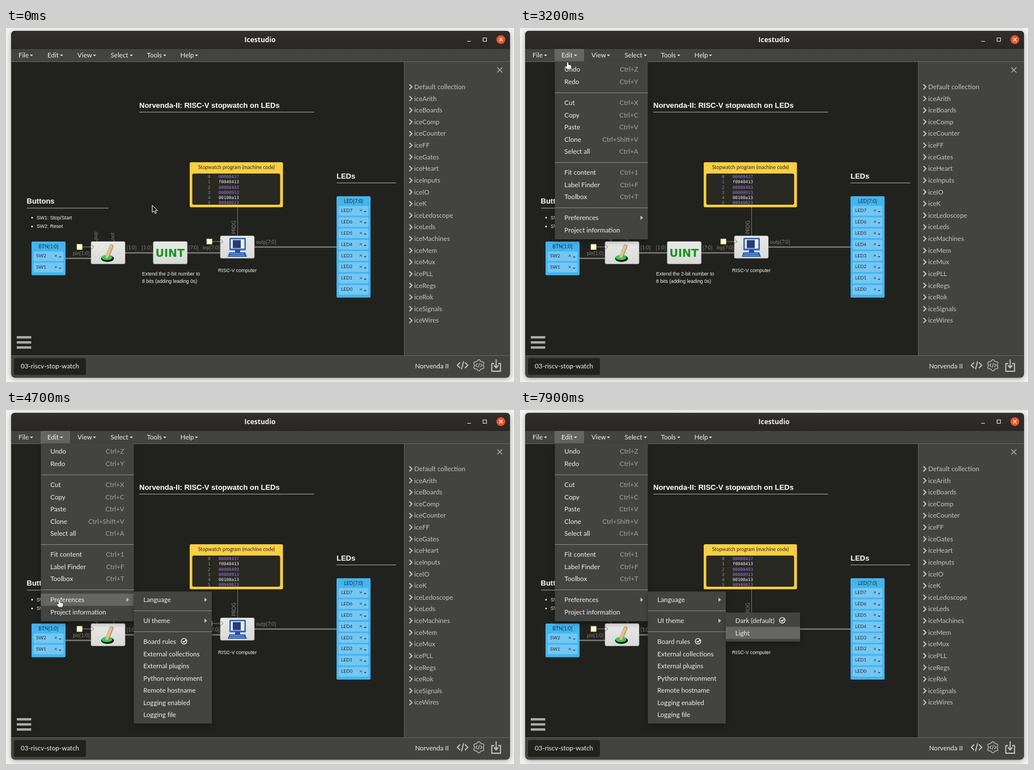
Recreate the animation shown at these times as an HTML page. Size 896 by 625 pixels, loop 8000 ms.

```html
<!DOCTYPE html>
<html lang="en">
<head>
<meta charset="utf-8">
<title>Icestudio</title>
<style>
  html, body { margin: 0; width: 100%; height: 100%; overflow: hidden; background: #f1f2f0; }
  svg { display: block; width: 896px; height: 625px; }
  text { white-space: pre; font-family: Lato, sans-serif; font-size: 11.6px; fill: #f0f0ee; }
  .head { font: bold 13px "Liberation Sans", Arial, sans-serif; fill: #fff; }
  .note { font: 8.7px "Liberation Sans", Arial, sans-serif; fill: #f4f4f4; }
  .port { font-size: 8.7px; fill: #82827f; }
  .label { font-size: 8.8px; fill: #202a30; }
  .pin { font-size: 8.3px; fill: #1c2d38; }
  .code { font: 7.5px "DejaVu Sans Mono", monospace; }
  .dim { fill: #a2a2a0; }
  .item { fill: #c4c4c2; }
  .menu { filter: drop-shadow(0 4px 5px rgba(0, 0, 0, .3)); }
</style>
</head>
<body>
<svg id="stage" viewBox="0 0 896 625">
  <defs>
    <linearGradient id="bar" x2="0" y2="1"><stop stop-color="#302f2d"/><stop offset="1" stop-color="#282725"/></linearGradient>
    <linearGradient id="chip" x2="0" y2="1"><stop stop-color="#e9e9e7"/><stop offset="1" stop-color="#d9d9d7"/></linearGradient>
    <filter id="soft" x="-5%" y="-5%" width="110%" height="110%"><feGaussianBlur stdDeviation="4"/></filter>
  </defs>
  <g id="scene"></g>
  <g id="menus"></g>
  <g id="arrow"><path d="M0 0V12.7L3 10L5.2 14.7L7.3 13.7L5.2 9.2H9.4Z" fill="#1c1c1c" stroke="#fff" stroke-linejoin="round"/></g>
  <g id="hand">
    <path d="M-1.6 1Q0-1 1.6 1V4.6L5.7 5.7Q7.3 6.2 7 8.5L6 13.3H-1L-4.8 8.4Q-4.8 6.4-1.6 7.8Z" fill="#fff" stroke="#222" stroke-width=".8"/>
    <path d="M-.6 11.8H5M2 7.5V9.5M4 7.8V9.5" stroke="#777" stroke-width=".6"/>
  </g>
</svg>
<script>
const $ = id => document.getElementById(id);
const rect = (x, y, w, h, fill, extra = '') =>
  `<rect x="${x}" y="${y}" width="${w}" height="${h}" fill="${fill}" ${extra}/>`;
const text = (x, y, s, cls = '', extra = '') => `<text x="${x}" y="${y}" class="${cls}" ${extra}>${s}</text>`;
const line = (d, color, w = 1, extra = '') => `<path d="${d}" fill="none" stroke="${color}" stroke-width="${w}" ${extra}/>`;
const shape = (d, fill) => `<path d="${d}" fill="${fill}"/>`;
const caret = (x, y, color, r = 3) => shape(`M${x - r} ${y}h${2 * r}l${-r} ${r}Z`, color);
const mid = 'text-anchor="middle"', end = 'text-anchor="end"';

function windowFrame() {
  let s = rect(9, 7, 880, 612, '#777', 'rx="7" filter="url(#soft)" opacity=".65"')
    + rect(9, 5, 880, 612.5, '#434441', 'rx="7"')
    + shape('M9 37V12Q9 5 16 5H882Q889 5 889 12V37Z', 'url(#bar)')
    + text(448, 25, 'Icestudio', '', `${mid} style="font:bold 12px 'Open Sans',sans-serif"`)
    + line('M813.5 23.5h6.5M841.5 17.5h6v6h-6Z', '#e8e8e6', 1.1)
    + '<circle cx="872.8" cy="20.5" r="7.8" fill="#e9552b"/>'
    + line('M869.8 17.5l6 6m0-6l-6 6', '#fff', 1.2)
    + rect(9.5, 59, 693, 519, '#21221e')
    + line('M9 59.5H889M702.5 59V578M9 578.5H889', '#646562');
  s += rect(14, 583, 127, 29.5, '#21221e', 'rx="3"') + text(26, 601, '03-riscv-stop-watch')
    + text(781, 601, 'Norvenda II', '', end);
  for (let i = 0; i < 3; i++) s += rect(19, 544 + 9 * i, 25.5, 4.2, '#aaaaa8');
  s += line('M801 590.5l-5 5 5 5M809.5 590.5l5 5-5 5M807 588.5l-3.5 14', '#c4c4c2', 1.8);
  let gear = '';
  for (let i = 0; i < 64; i++) {
    const a = i * Math.PI / 32, r = 8.8 + 1.1 * Math.cos(6 * a);
    gear += `${i ? 'L' : 'M'}${(834 + r * Math.sin(a)).toFixed(1)} ${(595.5 - r * Math.cos(a)).toFixed(1)}`;
  }
  s += line(gear + 'Z', '#c4c4c2', 1.3)
    + line('M831.5 592.5l-3 3 3 3M836.5 592.5l3 3-3 3M835 591.5l-2 8', '#c4c4c2', 1.1)
    + line('M861 592.5h-4.2v13.5h15.4V592.5H868M864.5 585v14M860.5 595.5l4 4.5 4-4.5', '#c4c4c2', 1.9);
  return s;
}

function menuBar() {
  return [['File', 22, 42], ['Edit', 73, 95], ['View', 126, 153], ['Select', 184.5, 218], ['Tools', 248.5, 277], ['Help', 307.5, 333]]
    .map(([s, x, c]) => text(x, 52, s) + caret(c + 3, 47, '#eeeeec', 2.8)).join('');
}

function sidePanel() {
  const names = ('Default collection,iceArith,iceBoards,iceComp,iceCounter,iceFF,iceGates,iceHeart,iceInputs,iceIO,iceK,'
    + 'iceLedoscope,iceLeds,iceMachines,iceMem,iceMux,icePLL,iceRegs,iceRok,iceSignals,iceWires').split(',');
  return line('M866.5 69.5l9 9m0-9l-9 9', '#b4b4b2', 1.3) + names.map((n, i) => {
    const y = 104 + 20.62 * i;
    return line(`M711.5 ${y - 4.5}l4.5 4.5-4.5 4.5`, '#c4c4c2', 2) + text(720, y + 4, n, 'item');
  }).join('');
}

function pinBlock(x, y, h, title, pins, first, pitch) {
  let s = rect(x, y, 60, h, '#41b5f0', 'rx="2"') + text(x + 30, y + 11.5, title, 'label', mid);
  pins.forEach((p, i) => {
    const c = first + pitch * i;
    s += rect(x + 3.5, c - 7.8, 53, 17, '#75c6f3', 'rx="2"') + text(x + 8, c + 2.8, p, 'pin')
      + line(`M${x + 41} ${c - 1.8}l3.6 3.6m0-3.6l-3.6 3.6`, '#24485c') + caret(x + 50.5, c + 1.2, '#1d3a4b', 2.4);
  });
  return s;
}

function clockPort(x, y) {
  return line(`M${x + 9} ${y}h18`, '#8a8a87') + rect(x, y - 4.7, 9.4, 9.4, '#ffffc4', 'stroke="#d8d8a0" stroke-width=".5"');
}

const chip = (x, y) => rect(x, y, 60, 39.5, 'url(#chip)', 'rx="2.5" stroke="#c2c2c0" stroke-width=".5"');
const notch = (x, y) => line(`M${x} ${y - 4}l4.5 4-4.5 4`, '#767673');

function program() {
  const code = ['00008437', 'f0040413', '00000493', '00000913', '00100a13', '00940023'];
  let s = rect(324, 237, 164.5, 79.5, '#f9cf43', 'rx="2.5"')
    + text(406.5, 249, 'Stopwatch program (machine code)', 'label', mid)
    + rect(328.5, 257, 155, 55, '#282923', 'rx="3"');
  code.forEach((c, i) => {
    const y = 265.3 + 9.1 * i;
    s += text(360.5, y, i, 'code', `${end} style="fill:#8f908a"`)
      + text(375, y, c, 'code', `style="fill:${i === 1 || i === 4 ? '#f8f8f2' : '#a47be8'}"`);
  });
  return s;
}

function diagram() {
  const leds = Array.from({ length: 8 }, (_, i) => 'LED' + (7 - i));
  return text(235, 141, 'Norvenda-II: RISC-V stopwatch on LEDs', 'head')
    + text(583, 265.5, 'LEDs', 'head') + text(36.5, 310, 'Buttons', 'head')
    + line('M235 148.5H543.5M583 273.5H688M37 318H181', '#a9a9a7')
    + '<circle cx="46" cy="335" r="1.4" fill="#fff"/><circle cx="46" cy="350.5" r="1.4" fill="#fff"/>'
    + text(54, 337.5, 'SW1: Stop/Start', 'note') + text(54, 353, 'SW2: Reset', 'note')
    + text(240, 436.5, 'Extend the 2-bit number to', 'note') + text(240, 449.5, '8 bits (adding leading 0s)', 'note')
    + text(374, 431, 'RISC-V computer', 'note')
    + line('M105 406.7H150M210 397H260M319 397H378M438 386.7H583', '#777774', 2.6)
    + line('M408.5 316V367', '#777774')
    + line('M160.5 374V377M190 374V377', '#777774')
    + clockPort(125, 386.5) + clockPort(354, 377)
    + text(118, 400.5, 'pin[1:0]', 'port') + text(212.5, 390.5, '[1:0]', 'port') + text(239.5, 390.5, '[1:0]', 'port')
    + text(322, 390.5, '[7:0]', 'port') + text(347, 390.5, 'inp[7:0]', 'port') + text(441, 381, 'outp[7:0]', 'port')
    + [[161, 374, 'pup'], [190.5, 374, 'not'], [405, 364, 'PROG']]
      .map(([x, y, s]) => text(0, 0, s, 'port', `transform="translate(${x} ${y}) rotate(-90)"`)).join('')
    + pinBlock(45, 377, 59.5, 'BTN[1:0]', ['SW2', 'SW1'], 402.2, 19.8)
    + pinBlock(583, 297, 179, 'LED[7:0]', leds, 322, 19.93)
    + program()
    + chip(150, 377) + notch(150.5, 386.5)
    + '<ellipse cx="179" cy="407" rx="11.5" ry="6" fill="#171717"/><ellipse cx="178" cy="405.3" rx="9.5" ry="4.5" fill="#20d64c"/>'
    + line('M178.5 404L186 385.5', '#b08c5c', 7, 'stroke-linecap="round"')
    + line('M178 403.5L185.5 385.5', '#dfc494', 5, 'stroke-linecap="round"')
    + chip(259.7, 377)
    + text(289.3, 403.5, 'UINT', '', `${mid} style="font:bold 19px 'DejaVu Sans',sans-serif;fill:#15951f"`)
    + chip(378, 367) + notch(378.5, 377)
    + rect(394, 370.5, 29, 22, '#2b62b5', 'rx="1.5"') + rect(396.5, 373, 24, 16.5, '#e8eef6')
    + rect(400, 374.5, 14, 14, '#283b76')
    + rect(404, 392, 9, 4, '#264f94')
    + shape('M394 396H422L425 404H391Z', '#2b62b5') + line('M396 398.5H420M394.5 401.5H421.5', '#b7cdec', 1, 'stroke-dasharray="2 1"');
}

$('scene').innerHTML = windowFrame() + menuBar() + sidePanel() + diagram();

// Rows: [centre y, label, shortcut | '>' for a submenu | 'ok' for a tick]
const menus = [
  { x: 61.5, y: 59, w: 164, h: 314, from: 2700, seps: [114, 237, 317],
    rows: [[73, 'Undo', 'Ctrl+Z'], [94.7, 'Redo', 'Ctrl+Y'], [132, 'Cut', 'Ctrl+X'], [153.5, 'Copy', 'Ctrl+C'],
      [175, 'Paste', 'Ctrl+V'], [196.5, 'Clone', 'Ctrl+Shift+V'], [218, 'Select all', 'Ctrl+A'], [255, 'Fit content', 'Ctrl+1'],
      [276.5, 'Label Finder', 'Ctrl+F'], [298, 'Toolbox', 'Ctrl+T'], [335, 'Preferences', '>'], [356.5, 'Project information']] },
  { x: 225.5, y: 320.5, w: 137.5, h: 233, from: 4700, seps: [354, 391],
    rows: [[335, 'Language', '>'], [372, 'UI theme', '>'], [409, 'Board rules', 'ok', 314], [430.5, 'External collections'],
      [452, 'External plugins'], [473.5, 'Python environment'], [495, 'Remote hostname'], [516.5, 'Logging enabled'], [538, 'Logging file']] },
  { x: 363, y: 357.5, w: 131, h: 51.5, from: 6400, seps: [],
    rows: [[372, 'Dark (default)', 'ok', 462.5], [393.5, 'Light']] }
];

function drawRow(m, [y, label, mark, markX]) {
  const right = m.x + m.w;
  let s = text(m.x + 16.8, y + 4.2, label);
  if (mark === '>') s += shape(`M${right - 13} ${y - 3.8}l4.6 3.8-4.6 3.8Z`, '#c2c2c0');
  else if (mark === 'ok') s += `<circle cx="${markX}" cy="${y - .7}" r="4.9" fill="none" stroke="#fff" stroke-width="1.3"/>`
    + line(`M${markX - 2.3} ${y - 1}l2 2.1 4.2-4.3`, '#fff', 1.6);
  else if (mark) s += text(right - 17, y + 4.2, mark, 'dim', end);
  return s;
}

$('menus').innerHTML = menus.map((m, i) => `<g id="menu${i}">`
  + (i ? '' : rect(61, 37, 52, 22, '#656663') + text(73, 52, 'Edit') + caret(98, 47, '#eeeeec', 2.8))
  + rect(m.x, m.y, m.w, m.h, '#434441', 'class="menu"')
  + rect(m.x, 0, m.w, 21.5, '#656663', `id="hover${i}"`)
  + m.seps.map(y => line(`M${m.x} ${y + .5}h${m.w}`, '#8a8b88')).join('')
  + m.rows.map(r => drawRow(m, r)).join('') + '</g>').join('');

// Each leg: start time, then one pointer position per 100 ms; the last one holds.
const legs = [
  [0, [258, 313]],
  [1400, [251, 303], [234, 279], [210, 246], [181, 206], [151, 165], [122, 128], [99, 99], [85, 82], [80, 77]],
  [2300, [81, 68], [82, 56], [83, 49]],
  [3200, [84, 60], [85, 75], [87, 105], [90, 165], [93, 228], [95, 265], [95, 296], [95, 319], [94.5, 332]],
  [4100, [94, 335]],
  [4900, [106, 334.5], [119, 333]],
  [5200, [152, 333], [200, 333], [230, 334]],
  [5600, [233, 349], [238, 367]],
  [5900, [246, 369], [262, 370], [283, 370], [304, 369], [323, 368], [339, 367], [353, 366], [362.8, 366], [374, 367]],
  [6800, [394, 372], [414, 381], [429, 391], [435, 395]]
];

function pointer(t) {
  const [start, ...pts] = legs.filter(l => l[0] <= t).pop();
  return pts[Math.min(pts.length - 1, Math.floor((t - start) / 100))];
}

function draw(t) {
  const [x, y] = pointer(t);
  menus.forEach((m, i) => {
    const open = t >= m.from;
    $('menu' + i).style.display = open ? '' : 'none';
    const over = open && x >= m.x && x < m.x + m.w && m.rows.find(r => Math.abs(r[0] - y) <= 10.75);
    const hover = $('hover' + i);
    hover.style.display = over ? '' : 'none';
    if (over) hover.setAttribute('y', over[0] - 10.75);
  });
  $('menu0').style.opacity = t < 2800 ? .4 : t < 2900 ? .8 : 1;
  const shown = t >= 7900 ? '' : t < 2400 ? 'arrow' : 'hand';
  for (const id of ['arrow', 'hand']) {
    $(id).style.display = id === shown ? '' : 'none';
    $(id).setAttribute('transform', `translate(${x} ${y})`);
  }
}

const t0 = performance.now();
function tick() {
  draw((performance.now() - t0) % 8000);
  requestAnimationFrame(tick);
}
tick();
</script>
</body>
</html>
```
